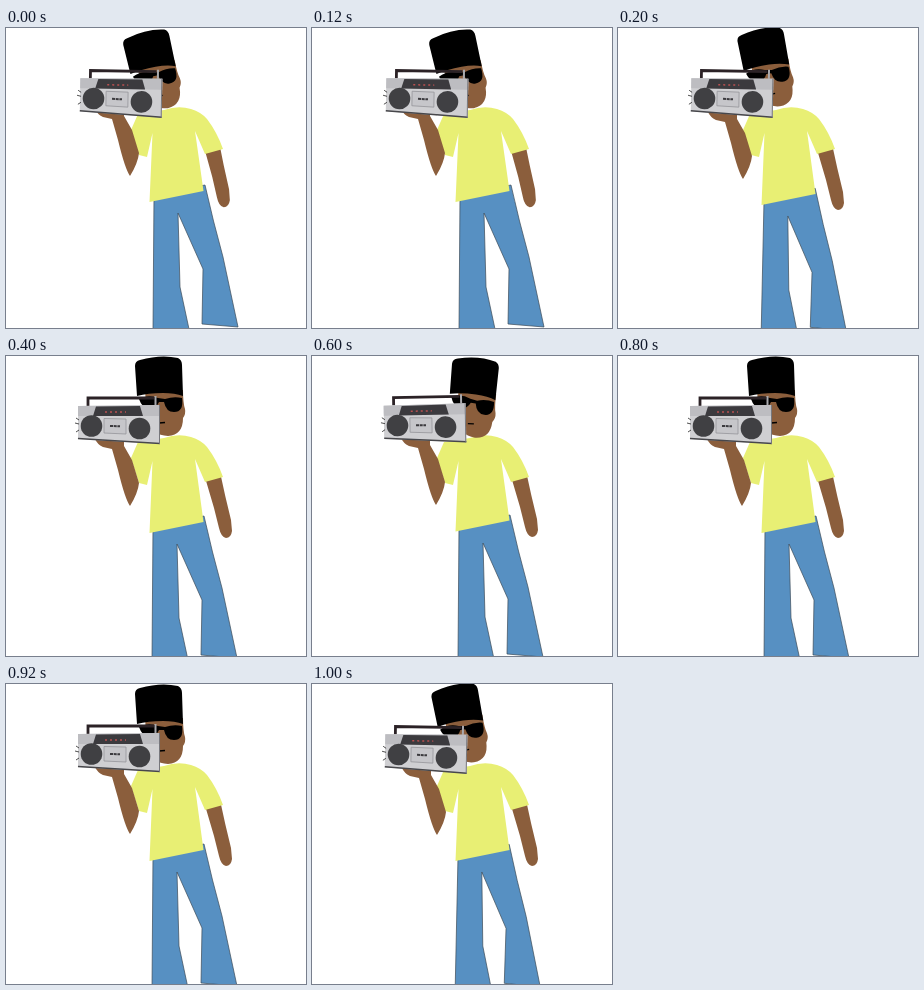
Recreate the animation shown at these times as an HTML page. Size 300x300 px, loop 1.2 s.

```html
<!DOCTYPE html>
<html lang="en">
<head>
<meta charset="utf-8">
<title>Boombox dancer</title>
<style>
html, body { margin: 0; width: 100%; height: 100%; overflow: hidden; background: #fff; }
svg { display: block; width: 100vw; height: 100vh; }
.skin { fill: #8b5e3c; }
</style>
</head>
<body>
<svg viewBox="0 0 300 300">
  <path id="armR" class="skin" d="M198 118 L214 116 Q219 140 225 164 L226 175 Q225 182 220 182 Q215 181 213 172 L208 152 Z"/>
  <path id="jeans" fill="#5790c2" stroke="#3c4a56" stroke-width=".7" d="M147 170 L198 160 Q206 196 216 232 L231 302 L195 299 L196 244 L171 188 L173 262 L182 304 L146 304 Z"/>
  <path id="shirt" fill="#e8ef74"/>
  <path id="armL" class="skin" d="M89 83 L118 84 L118 90 L126 104 L133 127 Q132 137 124 150 Q119 143 112 114 L106 93 L97 91 Q91 88 89 83 Z"/>
  <g id="head">
    <path class="skin" d="M139 33 L177 34 Q177 47 179 53 Q180 58 177 62 Q177 79 162 80 Q146 79 141 65 Z"/>
    <path d="M129 10 Q129 5 134 4 Q155 -2 172 2 Q176 4 176 9 L177 40 Q169 37 157 37 Q142 37 131 40 Z"/>
    <path d="M133 43 Q142 38 152 42 L159 43 Q168 40 176 42 Q178 56 168 56 Q160 56 158 46 L153 46 Q150 53 143 53 Q136 52 133 43 Z"/>
    <path d="M153 67 L159 66.5" stroke="#000" stroke-width="1.3"/>
  </g>
  <g id="radio">
    <path d="M82 50 L82 42 L148 42" fill="none" stroke="#2b2226" stroke-width="2.8"/>
    <path d="M149.5 40 L149.5 49" stroke="#a9a9ad" stroke-width="2"/>
    <path d="M72 50 L154 49 L154 88 L72 83 Z" fill="#cfcfd2"/>
    <path d="M72 50 L154 49 L154 60 L72 60 Z" fill="#bdbdc1"/>
    <path d="M72 82.5 L154 87.5" stroke="#47474b" stroke-width="1.5"/>
    <path d="M153.5 49 L153.5 88" stroke="#77777c"/>
    <path d="M90 50.5 L134 50 L137 60 L87 60 Z" fill="#3b3a3e"/>
    <path d="M99 56 L120 56" stroke="#b95050" stroke-width="1.5" stroke-dasharray="2 3"/>
    <path d="M98 62.5 L120 63 L120 78 L98 77 Z" fill="#c6c6ca" stroke="#95959a" stroke-width=".8"/>
    <path d="M104 70 L114 70.3" stroke="#3b3a3e" stroke-width="2" stroke-dasharray="3 .7"/>
    <g fill="#404043">
      <circle cx="85.5" cy="70" r="10.8"/>
      <circle cx="133.5" cy="72.5" r="10.8"/>
    </g>
    <path d="M70 62 L73 64 M69 67 L73 68 M70 76 L73 74" stroke="#222" stroke-width=".8"/>
  </g>
</svg>
<script>
const get = id => document.getElementById(id);
const pivots = { head: "157 80", radio: "112 70", armL: "145 100", armR: "205 110", jeans: "172 175" };

// Placement is [x, y, degrees]; hem is the vertical shift of the shirt's lower edge.
const poses = [
  { head: [0, 1, -10], radio: [2, 1, 1], armL: [0, -2, 0], armR: [-1, -3, 1], jeans: [1, -3, 0], hem: -3 },
  { head: [0, -1, -8], radio: [1, 1, 1], armL: [1, 1, 0], armR: [0, 0, 0], jeans: [-1, 0, .8], hem: 0 },
  { head: [0, 0, 0], radio: [0, 0, 0], armL: [0, 0, 0], armR: [0, 0, 0], jeans: [0, 0, 0], hem: 0 },
  { head: [1, 1, 8], radio: [0, -1, -1], armL: [0, -1, 0], armR: [0, -1, 0], jeans: [0, -1, 0], hem: -1.5 }
];

function show(pose) {
  for (const id in pivots) {
    const [x, y, turn] = pose[id];
    get(id).setAttribute("transform", `translate(${x} ${y}) rotate(${turn} ${pivots[id]})`);
  }
  get("shirt").setAttribute("d",
    `M132 86 L158 82 Q172 77 185 81 Q195 84 201 91 Q211 104 217 121 L199 126 L189 103
     L197.5 ${166 + pose.hem} L143.5 ${177 + pose.hem} L146.5 105 L141 129 L133 127 L125 102 Z`);
}

const order = [0, 1, 2, 3, 2, 1];
function tick() {
  show(poses[order[Math.floor(performance.now() / 200) % 6]]);
  requestAnimationFrame(tick);
}
tick();
</script>
</body>
</html>
```
